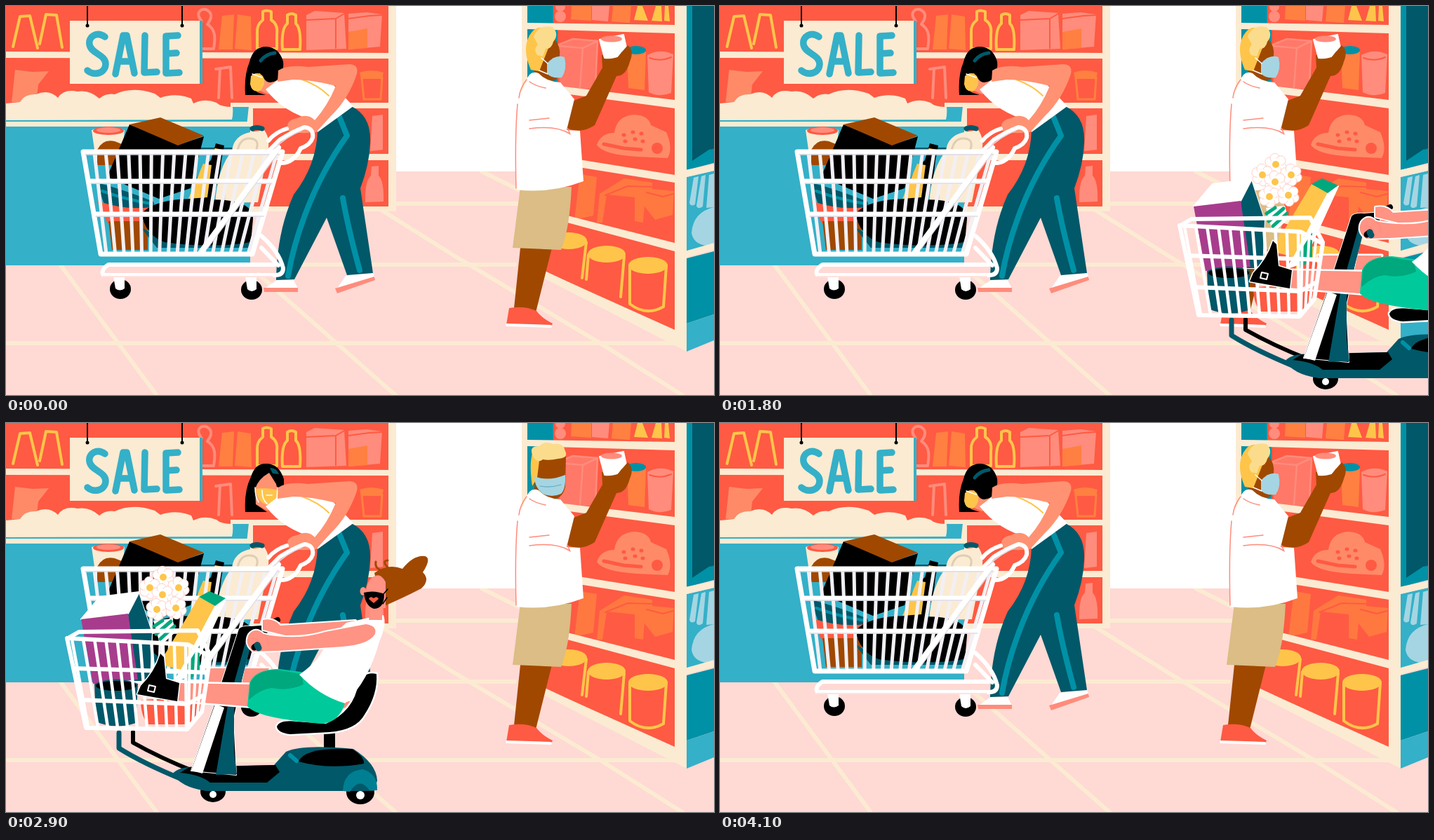
An HTML page for the animation above (4600 ms loop, 1009 by 555 pixels).

```html
<!DOCTYPE html>
<html lang="en">
<head>
<meta charset="utf-8">
<title>Supermarket sale</title>
<style>
html, body { margin: 0; width: 100%; height: 100%; overflow: hidden; background: #ffd9d4; }
svg { display: block; width: 100%; height: 100%; }
</style>
</head>
<body>
<svg id="stage" viewBox="0 0 1009 555" role="img" aria-label="SALE: shoppers in a supermarket"></svg>
<script>
const LOOP = 4600;
const RED = '#ff5a43', CREAM = '#fbebd2', TEAL = '#34b0c8', MID = '#0091a6', DARK = '#005869',
  PINK = '#ffd9d4', ORANGE = '#ff8040', SALMON = '#ff8c7c', PEACH = '#ff8a68', YELLOW = '#fec54a',
  SKIN = '#ff9272', ROSE = '#ff9384', BROWN = '#a04800', GREEN = '#00ca9b', LEAF = '#00a87d',
  WHITE = '#fff', BLACK = '#000';

const fill = (color, d) => `<path fill="${color}" d="${d}"/>`;
const line = (color, width, d) =>
  `<path fill="none" stroke="${color}" stroke-width="${width}" stroke-linecap="round" stroke-linejoin="round" d="${d}"/>`;
const halo = (color, d, width = 5) =>
  `<path fill="${color}" stroke="#fff" stroke-width="${width}" stroke-linejoin="round" paint-order="stroke" d="${d}"/>`;
const oval = (color, x, y, rx, ry = rx) => `<ellipse fill="${color}" cx="${x}" cy="${y}" rx="${rx}" ry="${ry}"/>`;
const group = (id, ...parts) => `<g id="${id}">${parts.join('')}</g>`;

// Evenly spread bars between an upper and a lower edge, each [x1, y1, x2, y2].
function bars(count, top, bottom) {
  const at = (e, k) => `${e[0] + (e[2] - e[0]) * k} ${e[1] + (e[3] - e[1]) * k}`;
  return Array.from({ length: count }, (_, i) => {
    const k = i / (count - 1);
    return `M${at(top, k)}L${at(bottom, k)}`;
  }).join('');
}

function flower(x, y) {
  let petals = '';
  for (let i = 0; i < 6; i++) {
    const a = i * Math.PI / 3 + 0.4;
    petals += `<circle cx="${x + 9 * Math.cos(a)}" cy="${y + 9 * Math.sin(a)}" r="6.8" fill="#fff" stroke="#ffcfc6"/>`;
  }
  return petals + oval(WHITE, x, y, 8) + oval(YELLOW, x, y, 5);
}

const room = [
  fill(PINK, 'M0 0H1009V555H0Z'),
  line(CREAM, 6, 'M556 282H730M350 369H725M0 481H970M78 370L216 557M360 383L556 556M530 288L640 357L850 483L965 556M678 236L730 262'),
  fill(WHITE, 'M556 0H743V236H556Z'),
  fill(RED, 'M0 0H545V288H0Z'),
  fill(CREAM, 'M545 0H556V293H350V286H545ZM0 65L545 67V75L0 74ZM320 138H545V146H320ZM350 211H545V220H350Z')
].join('');

const backGoods = [
  line(YELLOW, 4, 'M10 58L20 15L34 14L45 60M48 54L57 12L72 13L80 59'),
  line(SALMON, 4, 'M279 22C268 8 280 2 287 6C297 12 290 22 287 26C300 34 298 48 296 61H278M303 131L305 89M299 90L320 87L322 131'),
  fill(ORANGE, 'M308 14L325 12L323 62H303ZM330 12L349 15L350 63L326 61ZM504 95Q520 89 538 95L536 104H506Z'),
  line(ORANGE, 3, 'M507 103L510 133H534L536 102'),
  line(YELLOW, 4, 'M366 8Q371 5 378 8V20Q388 26 386 40V61H358V38Q357 27 366 20ZM401 13Q407 9 413 13V25Q421 32 419 62H394Q392 32 401 25Z'),
  fill(SALMON, 'M428 13L440 7L482 10L485 61L428 63ZM488 11L514 9L536 12L533 58L488 62ZM522 157L537 155V205L519 207Z'),
  line(RED, 2, 'M428 20L470 18L482 11M470 18V60M488 18L518 14L535 13'),
  fill(ORANGE, 'M488 37L515 32V60L488 62Z'),
  fill(PEACH, 'M13 91L38 94L61 93L46 112L43 137H8Z'),
  fill(SALMON, 'M521 229L531 228L531 242Q539 250 538 279L512 280Q511 250 520 242Z')
].join('');

const counter = [
  fill(TEAL, 'M0 144H348V370H0Z'),
  fill(CREAM, 'M0 165H349V172H0ZM346 143H352V200H348V171H343Z'),
  fill(CREAM, 'M0 139L20 137Q27 125 43 126Q61 118 74 131Q82 118 102 122Q119 119 133 132Q143 124 155 126Q180 114 212 125L220 131Q242 123 264 132L267 139Q283 131 300 138Q306 144 323 144Q324 154 322 162L0 163Z')
].join('');

const sign = [
  fill(TEAL, 'M274 21H280V111H274Z'), fill(CREAM, 'M91 21H276V111H91Z'),
  line(BLACK, 2, 'M116 0V27M251 0V27'), oval(BLACK, 116, 28, 2.5), oval(BLACK, 251, 28, 2.5),
  line(TEAL, 9.5, 'M141 44C130 36 117 43 119 55C121 68 142 69 142 83C141 98 124 99 116 92M156 97L167 42L172 42L183 96M160 79H179M198 42L197 95L215 94M245 42L228 43V96L247 95M228 68L243 67')
].join('');

const aisle = [
  fill(RED, 'M768 0H953V465L768 378Z'),
  fill(MID, 'M743 0H780V24L786 34V130H743Z'), fill(CREAM, 'M735 0H743V130H735Z'),
  fill('#ff7868', 'M788 55L808 46L844 49L840 118L789 120Z'),
  fill(SALMON, 'M914 70Q932 60 951 69L948 124Q931 131 916 123ZM835 0H860L858 22L835 20Z'),
  line(SALMON, 2.5, 'M788 55L808 47L843 50L840 114M788 57L822 60L843 50M822 60L818 116'),
  line(RED, 2, 'M917 74Q932 80 948 73'),
  oval(SALMON, 790, 1, 7), oval(SALMON, 790, 15, 8),
  fill(ORANGE, 'M806 0H834V21L805 19ZM865 0H891L889 24L863 22ZM885 65H912L910 120L887 117Z'),
  oval(MID, 898, 63, 14, 6),
  fill(YELLOW, 'M900 0H907L915 21L895 20ZM926 0H934L935 22L920 21ZM939 0H944L946 22L938 21Z'),
  fill(PEACH, 'M842 198Q848 181 867 181Q870 157 895 155Q916 156 919 170L941 180Q951 203 943 217L900 215Q850 212 842 198Z'),
  line(RED, 5, 'M880 184h1M893 180h1M905 182h1M882 193h1M896 190h1M907 193h1M852 197L880 203L905 205'),
  oval(RED, 928, 203, 8),
  fill('#ff7840', 'M818 240L842 244L837 299L810 305ZM846 268L881 246L921 252V286L911 271L908 309L896 307V273L856 269L850 309H842ZM909 260L952 264L950 298L925 305L910 286Z'),
  line(RED, 2, 'M854 270L886 257L920 258M913 266L936 272L951 268'),
  oval(YELLOW, 802, 335, 26, 12), oval(YELLOW, 856, 354, 27, 12), oval(YELLOW, 915, 370, 28, 12),
  line(YELLOW, 4, 'M827 337L821 388M830 355L827 390M881 357L876 415M889 371V425Q912 443 937 429L941 371'),
  fill(CREAM, 'M743 24L953 27V39L743 33ZM795 115L953 134V146L795 125ZM810 218L953 241V252L810 229ZM800 299L953 338V350L800 309ZM762 376L953 462V0H970V493L762 386Z'),
  fill(MID, 'M970 0H1009V224L970 234ZM970 360L1009 350V440L970 453Z'),
  fill(DARK, 'M978 0H1009V203L978 222Z'), line(MID, 3, 'M976 224L1003 206H1009'),
  fill(TEAL, 'M970 244L1009 235V340L970 351ZM970 453L1009 440V477L970 493Z'),
  fill('#a5d5e2', 'M980 245L987 243L982 283Q976 287 974 281ZM991 243L997 241L993 286Q986 291 984 285ZM1002 241L1009 239V287L998 288ZM1009 287Q979 294 977 324Q980 343 1009 343Z'),
  fill(CREAM, 'M953 237L1009 226V235L953 248ZM953 354L1009 338V348L953 363Z')
].join('');

const manSide = group('manSide',
  fill(BROWN, 'M765 58L781 47Q791 57 789 72L796 91Q785 112 765 106L752 92Z'),
  fill(YELLOW, 'M748 91Q735 62 746 42Q755 27 767 32L773 60L760 93Z'),
  fill('#fbdc8c', 'M752 44Q758 26 779 30Q789 40 780 51Q778 61 769 61L765 72L757 70Q751 62 758 55Z'),
  fill('#a5d5e2', 'M771 82Q783 68 796 73Q800 91 792 102Q777 104 771 96Z'),
  line(WHITE, 1.5, 'M763 74L772 82M760 92L772 97'));
const manFront = group('manFront',
  fill(BROWN, 'M754 48H798L797 91Q793 110 775 109L753 96Z'),
  fill(YELLOW, 'M750 90Q745 57 751 40L762 38L757 78Z'),
  fill('#fbdc8c', 'M751 48Q744 32 760 33Q768 25 779 30Q795 27 797 40Q802 50 787 51Q774 54 765 52Q758 58 751 48Z'),
  fill('#a5d5e2', 'M753 76Q773 84 797 74Q798 94 791 101Q778 107 765 101Q753 92 753 76Z'),
  line('#67aabd', 1.2, 'M761 90Q775 93 791 88'));
const man = [
  fill(BROWN, 'M733 345H778L755 437L724 431Z'),
  fill(RED, 'M717 431Q739 427 756 435Q763 445 779 453L777 457L713 455Z'), line(WHITE, 4, 'M714 455L776 457'),
  fill('#dbbd85', 'M733 258H806Q803 320 791 348L722 345Z'),
  fill(BROWN, 'M804 137L827 128L850 88L849 70L874 73L884 58Q894 67 890 75Q885 100 870 100L839 170Q820 183 799 174Z'),
  manSide, manFront,
  fill(WHITE, 'M741 108Q746 91 759 96Q770 108 790 109L810 133L799 177L818 178L823 250Q776 268 727 262Q725 174 728 140Z'),
  line(SALMON, 1.5, 'M727 260Q725 185 729 140M742 105Q733 116 731 131M746 108Q754 114 769 117M746 163L774 160M746 175Q784 170 803 182M800 174L804 183'),
  halo(WHITE, 'M846 48L880 41L885 64Q870 76 853 74Z', 2), oval(SALMON, 863, 47, 15, 4.5),
  fill(BROWN, 'M880 63L886 56Q895 63 890 77L879 96L864 92Q866 77 880 63Z')
].join('');

const womanSide = group('womanSide',
  fill(SKIN, 'M361 96H391L393 106L374 126L360 120Z'),
  fill(BLACK, 'M341 127Q339 99 347 80Q352 58 371 58Q389 59 395 79Q397 97 386 106Q374 113 368 104L362 96L352 97L348 112L358 123L370 127Z'),
  line(DARK, 5, 'M363 78Q371 68 383 67'),
  fill(YELLOW, 'M349 100Q358 92 366 100Q372 111 362 121Q350 124 348 111Z'), line(WHITE, 1.5, 'M351 97L365 102'));
const womanFront = group('womanFront',
  fill(SKIN, 'M356 86L374 68L389 91L388 113L373 125L356 116Z'),
  fill(BLACK, 'M341 127Q339 97 349 77Q355 57 371 58Q389 58 396 80V101L389 105L385 87L375 71Q359 80 355 94L356 116L372 127Z'),
  fill(DARK, 'M376 64Q386 64 389 73L380 72Z'),
  fill(YELLOW, 'M356 94Q371 91 389 96Q388 112 376 117Q359 117 356 94Z'),
  line(WHITE, 1.6, 'M355 92Q355 105 360 113M365 96Q365 110 372 115M371 103h8M387 92L386 110'));
const woman = [
  fill(WHITE, 'M386 391H410L416 403L367 404ZM484 385L522 378L526 388L470 406Z'),
  fill(SALMON, 'M367 402H416V408H368ZM469 403L525 386L526 391L472 410Z'),
  fill(DARK, 'M492 143Q521 157 519 195Q518 226 505 260L523 381L486 384L457 302L411 390L385 391Q386 322 410 269Q443 227 444 176Z'),
  line(MID, 8, 'M475 158L486 185Q448 238 425 301Q409 344 402 385'), line(MID, 8, 'M480 274Q487 315 504 377'),
  womanSide, womanFront,
  fill(WHITE, 'M370 119L388 105Q426 101 463 109L495 143L444 180L439 163Q397 153 370 119Z'),
  line(YELLOW, 2, 'M422 105Q445 113 460 128'),
  fill(SKIN, 'M388 92Q402 83 430 87L490 83Q503 84 500 97Q488 133 463 157L442 180Q417 183 402 178Q397 163 415 160Q430 152 440 163Q458 143 470 114Q435 105 409 105L387 108Z')
].join('');

const cart = [
  line(DARK, 6, 'M278 205H352'),
  fill(CREAM, 'M122 177Q145 169 169 177L164 226H129Z'), oval(RED, 146, 178, 22, 6), oval(SALMON, 146, 177, 17, 4),
  fill(BROWN, 'M130 205Q138 189 155 193L165 197L159 227H130Z'),
  fill(BLACK, 'M176 169L246 198L282 186L263 260L218 275L144 244Z'), fill(BROWN, 'M176 169L220 159L282 185L245 199Z'),
  fill(BLACK, 'M299 196L311 199L307 220Q305 252 292 277L262 276Q271 235 292 220Z'),
  fill(YELLOW, 'M281 225L293 227L287 273L260 275Z'), line(YELLOW, 2, 'M298 204L309 206'),
  fill(CREAM, 'M348 180L368 177Q378 190 372 213L359 280L298 281Q302 230 322 207Q324 185 348 180Z'),
  line('#dfceb4', 3, 'M330 207Q333 188 348 189Q363 190 356 207M315 237Q311 255 311 278'),
  line(DARK, 7, 'M351 175Q357 172 365 175'),
  fill(DARK, 'M130 252Q168 262 210 279L218 303L153 310Q139 286 130 252Z'), line(MID, 4, 'M137 264Q170 276 207 282'),
  fill(RED, 'M130 278Q170 292 207 287L203 310H145Z'),
  fill(BROWN, 'M146 307H202V348H151Z'),
  fill(DARK, 'M190 313Q235 350 349 337V345H215Z'),
  fill(BLACK, 'M193 296Q216 271 287 276Q353 275 352 304L349 337Q293 346 226 337Q199 327 193 296Z'),
  line('#f2f0f4', 5, bars(17, [126, 210, 386, 210], [143, 354, 345, 354])),
  line(WHITE, 7, 'M110 208H394L351 354H135ZM119 250H381M126 297H368'),
  line('#dedce5', 1.5, 'M113 212H390M121 253H379M128 300H367'),
  line(WHITE, 8, 'M278 351L388 202'), line('#dedce5', 1.2, 'M287 346L388 210'),
  line(WHITE, 6, 'M374 207L390 191Q407 180 425 173Q439 174 437 188Q434 198 420 203Q410 225 390 224M374 192Q384 180 400 175'),
  line('#dedce5', 1.5, 'M383 203Q400 186 421 178'),
  line(WHITE, 6, 'M364 328Q389 350 395 374Q395 384 384 384H139Q134 377 146 369H382M364 345L388 370'),
  oval(BLACK, 163, 404, 15, 14), oval(BLACK, 350, 405, 15, 14),
  fill(WHITE, 'M153 386L169 387V403Q162 408 156 403ZM341 386L357 387V404Q350 410 344 404Z'),
  line(PINK, 1.5, 'M138 386H380')
].join('');

const hairBlown = group('hairBlown',
  fill(BROWN, 'M775 216Q794 202 815 210Q831 190 847 192Q857 195 844 215Q855 226 842 238Q817 251 787 264Z'),
  line(BROWN, 3, 'M791 213Q775 212 777 200M797 211Q784 199 794 198'),
  fill(ROSE, 'M768 226Q782 211 791 229V266H786V283H767L770 263Q757 245 768 226Z'), oval(ROSE, 759, 242, 4.5, 6),
  fill(BLACK, 'M760 244Q775 240 789 246Q789 267 774 267Q762 263 760 244Z'), line(BLACK, 1.5, 'M788 246L794 239M787 260L793 251'),
  fill(RED, 'M774 259L767 253Q769 248 774 252Q779 248 781 253Z'));
const hairTurned = group('hairTurned',
  fill(ROSE, 'M769 224Q784 212 793 225L787 284L767 278L772 264Q756 247 769 224Z'),
  fill(BROWN, 'M781 214Q788 195 807 194Q827 184 844 192Q840 205 853 211Q847 219 846 235Q827 264 792 255L785 241Z'),
  line(BROWN, 3, 'M791 212Q778 209 777 199M797 207Q785 198 794 196'),
  fill(BLACK, 'M756 239Q767 230 775 238L772 263Q757 266 754 250Z'), line(BLACK, 1.3, 'M773 241L785 239'));

const posy = [[474, 222], [455, 237], [496, 237], [473, 247], [465, 268], [492, 266]];
const groceries = [
  halo(DARK, 'M424 274L439 244L458 302L455 370H428Z', 2),
  halo(WHITE, 'M357 282L384 250L440 243L424 274Z', 2), fill('#a83c8c', 'M357 282L424 274L438 368L374 374Z'),
  fill(WHITE, 'M460 284L487 281L492 300L470 320Z'),
  line(LEAF, 5, 'M461 292L473 284M464 303L485 285M470 310L490 292'),
  ...posy.map(([x, y]) => flower(x, y)),
  halo(WHITE, 'M548 262L563 253L513 362L491 370Z', 2), fill(YELLOW, 'M525 250L548 262L499 354L468 346Z'),
  fill(LEAF, 'M525 250L540 242L563 252L548 263Z'), fill(LEAF, 'M508 347L526 319V356L504 374Z'),
  fill(DARK, 'M376 374Q407 361 438 374L435 430Q406 440 378 428Z'), oval(BLACK, 407, 377, 29, 7),
  fill(RED, 'M442 397L530 393Q527 424 513 432H453Q442 421 442 397Z')
].join('');

const basket = [
  line(WHITE, 4.5, bars(11, [344, 311, 506, 318], [367, 436, 507, 438])),
  line(WHITE, 4, bars(4, [512, 319, 541, 335], [510, 437, 529, 410])),
  line(WHITE, 6, 'M337 309L509 318L541 335L529 414L508 439L364 437ZM346 352L510 357L537 358M356 397L509 403L532 390M340 308L354 300L523 298L541 333')
].join('');

const scooter = group('scooter',
  line(DARK, 7, 'M411 444V466Q446 488 505 512'), line(BLACK, 6, 'M431 443V458Q470 480 518 499'),
  halo(ROSE, 'M534 352H625L613 377L537 372Z'),
  groceries,
  oval(BLACK, 545, 528, 18, 15), oval(BLACK, 755, 529, 20, 17),
  fill(BLACK, 'M703 440H719V470H703Z'),
  fill(DARK, 'M488 502Q496 491 530 492L632 490L649 471Q672 460 745 467Q778 488 779 512L775 527H535Q497 521 488 502Z'),
  fill(BLACK, 'M511 493L634 490L640 500L622 515H541Q526 503 498 501Z'),
  fill(BLACK, 'M667 485Q675 464 743 467Q761 478 760 488Q710 497 667 485Z'),
  fill('#007f92', 'M730 527Q731 499 758 496Q780 502 779 526L768 526Q754 506 740 528Z'), line(MID, 6, 'M655 476L664 484'),
  oval(WHITE, 545, 532, 5), oval(WHITE, 755, 533, 6),
  halo(BLACK, 'M582 296Q586 291 600 292L626 290L621 306L599 309L574 424L578 504L514 498L546 407Z', 2),
  fill(WHITE, 'M548 403L561 408L530 502L514 498Z'),
  fill(DARK, 'M594 305Q602 300 600 315L575 411V472L579 503L549 504L566 405Z'),
  line(BLACK, 8, 'M618 293L637 283'),
  halo(ROSE, 'M616 283Q632 280 641 291L748 284L735 304L648 305L616 297Z', 4),
  halo(BLACK, 'M636 435Q640 425 665 428L706 431Q746 413 752 374Q760 356 778 360Q780 389 761 418Q749 440 711 443L655 446Q637 444 636 435Z'),
  halo(ROSE, 'M493 373L605 375V407L492 398Z'),
  fill(GREEN, 'M597 373Q605 353 640 353L670 357Q706 370 733 402Q724 430 699 431Q607 423 594 406Z'),
  fill(LEAF, 'M598 373Q606 355 635 354L671 360L674 375Q652 385 629 380Q612 382 596 397Z'),
  fill(WHITE, 'M735 287L766 280L788 276Q793 290 782 314Q767 370 733 402Q696 391 668 361Q700 339 708 311Z'),
  hairBlown, hairTurned,
  halo(ROSE, 'M596 304Q605 292 617 303Q664 313 705 300L763 289Q779 291 776 303Q767 318 730 321L638 327L603 328Q589 318 596 304Z', 4),
  line(SALMON, 1.5, 'M600 309Q610 309 613 317M618 304Q625 310 623 319'),
  line(BLACK, 9, 'M604 322L608 319'), line(DARK, 9, 'M608 319L610 323'),
  basket,
  halo(BLACK, 'M470 331L475 336L478 367L497 373L494 399L437 389L442 377Q462 357 470 331Z', 3),
  line(WHITE, 2, 'M454 376L463 378L461 386L452 384Z'));

document.getElementById('stage').innerHTML =
  room + backGoods + counter + sign + aisle + man + woman + cart + scooter;

// Hold each value until the next time in the table.
function hold(id, property, steps) {
  const frames = [...steps, [LOOP, steps[steps.length - 1][1]]]
    .map(([time, value]) => ({ offset: time / LOOP, [property]: value, easing: 'steps(1, end)' }));
  document.getElementById(id).animate(frames, { duration: LOOP, iterations: Infinity });
}

const path = [
  [0, 700, 0], [1600, 482, 5], [1700, 400, 5], [1800, 318, 4], [1900, 236, 4], [2100, 78, 2], [2300, 0, 0],
  [2500, -77, -1], [2700, -153, -2], [2900, -250, -2], [3100, -339, -1], [3300, -433, -1],
  [3500, -519, -1], [3700, -616, -1], [3900, -709, -1], [4100, -900, 0]
];
hold('scooter', 'transform', path.map(([t, x, y]) => [t, `translate(${x}px, ${y}px)`]));

const during = (from, to) => [[0, 0], [from, 1], [to, 0]];
const except = (from, to) => [[0, 1], [from, 0], [to, 1]];
for (const who of ['man', 'woman']) {
  hold(who + 'Side', 'opacity', except(1900, 4100));
  hold(who + 'Front', 'opacity', during(1900, 4100));
}
hold('hairTurned', 'opacity', during(3300, 3500));
hold('hairBlown', 'opacity', except(3300, 3500));
</script>
</body>
</html>
```
